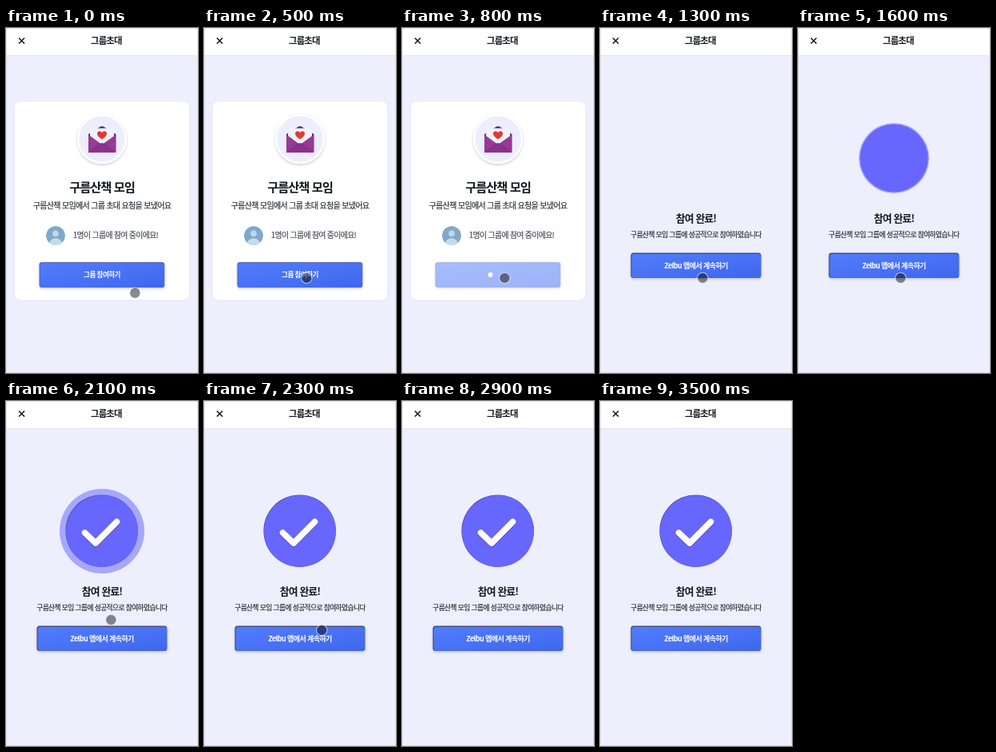
These frames come from a looping animation (240x432 px, 3600 ms). An HTML page:

```html
<!DOCTYPE html>
<html lang="ko">
<head>
<meta charset="utf-8">
<title>그룹초대</title>
<style>
html, body { margin: 0; width: 100%; height: 100%; overflow: hidden; background: #eeeffd; }
svg { display: block; width: 240px; height: 432px; }
text {
  font-family: "Noto Sans CJK KR", "Noto Sans CJK", "Noto Sans", sans-serif;
  letter-spacing: -.067em;
  color: #16181f; fill: currentColor; stroke: currentColor; stroke-width: .2px;
}
.mid { text-anchor: middle; }
.bold { font-weight: 700; stroke: none; }
.body { color: #2b2e36; }
.note { color: #4a4f59; }
.label { color: #fff; font-weight: 700; stroke: none; }
</style>
</head>
<body>
<svg viewBox="0 0 240 432">
  <defs>
    <linearGradient id="blue" x2="1" y2="1">
      <stop stop-color="#527cfd"/><stop offset="1" stop-color="#3f67ed"/>
    </linearGradient>
    <filter id="soft" x="-20%" y="-30%" width="140%" height="170%">
      <feDropShadow dx="0" dy="1.5" stdDeviation="1.5" flood-color="#334" flood-opacity=".25"/>
    </filter>
    <filter id="faint" x="-5%" y="-5%" width="110%" height="110%">
      <feDropShadow dx="0" dy=".5" stdDeviation=".8" flood-color="#334" flood-opacity=".05"/>
    </filter>
    <clipPath id="face"><circle cx="62" cy="260" r="12"/></clipPath>
  </defs>

  <rect width="240" height="432" fill="#eeeffd"/>
  <rect width="240" height="34.5" fill="#fff"/>
  <path d="M0 34.5H240" stroke="#e4e5ee"/>
  <rect x=".25" y=".25" width="239.5" height="431.5" fill="none" stroke="#c9cbd4" stroke-width=".6"/>
  <path d="M16.1 12.5l7 7m0-7l-7 7" stroke="#111" stroke-width="1.5"/>
  <text class="mid bold" x="125.3" y="19.7" font-size="11.3">그룹초대</text>

  <g id="invite">
    <rect x="11" y="92" width="218" height="248.5" rx="7" fill="#fff" filter="url(#faint)"/>
    <circle cx="120" cy="139" r="31" fill="#fff" filter="url(#soft)"/>
    <circle cx="120" cy="139" r="28.7" fill="#eceefc"/>
    <path d="M103 133L118 123.5q2-1.2 4 0L137.3 133V155H103Z" fill="#56205c"/>
    <path d="M105 125.5H135V148H105Z" fill="#f1f1f9"/>
    <path d="M120 139.5c-3-2.3-6-4.4-6-7.2 0-3.4 4.2-4.3 6-1.2 1.8-3.1 6-2.2 6 1.2 0 2.8-3 4.9-6 7.2z" fill="#e23a34"/>
    <path d="M103 133.5L120 146L137.3 133.5V156H103Z" fill="#963a94"/>
    <path d="M103.2 156L118 145q2-1.3 4 0L137.1 156Z" fill="#8a338b"/>
    <path d="M103.5 155.5L118 145q2-1.3 4 0L137 155.5" fill="none" stroke="#6f2474" stroke-width=".6"/>
    <text class="mid bold" x="120" y="204.6" font-size="15.3">구름산책 모임</text>
    <text class="mid body" x="120" y="226.4" font-size="10">구름산책 모임에서 그룹 초대 요청을 보냈어요</text>
    <g clip-path="url(#face)">
      <circle cx="62" cy="260" r="12" fill="#7fa9c8"/>
      <circle cx="62" cy="257.4" r="3.8" fill="#bfd7e7"/>
      <ellipse cx="62" cy="269.3" rx="7.6" ry="6" fill="#c6dbe9"/>
    </g>
    <text class="note" x="83.8" y="263.2" font-size="9.9">1명이 그룹에 참여 중이에요!</text>
    <g id="join">
      <rect x="41.6" y="293.3" width="156.6" height="31.7" rx="3.4" fill="#4a5cab" filter="url(#soft)"/>
      <rect x="42.5" y="294.3" width="155.5" height="30.7" rx="3" fill="url(#blue)"/>
      <text id="joinText" class="mid label" x="120" y="312.3" font-size="8.6">그룹 참여하기</text>
    </g>
    <g id="dots" fill="#fffdf8">
      <circle cx="110.5" cy="309"/><circle cx="120" cy="309"/><circle cx="129.5" cy="309"/>
    </g>
  </g>

  <g id="done">
    <circle id="ring" cx="120" cy="163" fill="#6766ff"/>
    <circle id="rim" cx="119.6" cy="162.6" fill="#4b4b9c"/>
    <circle id="disc" cx="120" cy="163" fill="#6766ff"/>
    <g fill="none" stroke-width="7.6" stroke-linecap="round" stroke-linejoin="round" stroke-dasharray="100 100">
      <path class="tick" pathLength="100" d="M98 166.3L112 179.3L139 152.3" stroke="#4545a8" stroke-opacity=".55"/>
      <path class="tick" pathLength="100" d="M98.5 165L112 178L138.5 151.3" stroke="#fff"/>
    </g>
    <text class="mid bold" x="120" y="242.8" font-size="12.8">참여 완료!</text>
    <text class="mid body" x="120" y="262.3" font-size="8.73">구름산책 모임 그룹에 성공적으로 참여하였습니다</text>
    <rect x="38.5" y="281.6" width="162.9" height="31.5" rx="3.5" fill="#46507f" filter="url(#soft)"/>
    <rect x="39.8" y="283.1" width="161.2" height="29.7" rx="3" fill="url(#blue)"/>
    <text class="mid label" x="120" y="300.8" font-size="9">Zelbu 앱에서 계속하기</text>
  </g>

  <circle id="pointer" r="6.7" fill="#000" fill-opacity=".46" stroke="#fff" stroke-opacity=".55" stroke-width="1.2"/>
</svg>
<script>
const LOOP = 3600, STEP = 100, DONE = 1300;
const $ = id => document.getElementById(id);
const set = (el, attrs) => { for (const k in attrs) el.setAttribute(k, attrs[k]); };
const show = (el, on) => { el.style.display = on ? "" : "none"; };
const clamp = v => Math.max(0, Math.min(1, v));

// Linear interpolation through [time, value] keys
function track(keys, t) {
  let i = 1;
  while (i < keys.length - 1 && keys[i][0] < t) i++;
  const [t0, a] = keys[i - 1], [t1, b] = keys[i];
  return a + (b - a) * clamp((t - t0) / (t1 - t0));
}

const pointerX = [[0, 161.3], [250, 143], [500, 128.3], [1900, 128.3], [2100, 131.3], [2300, 147.2], [2500, 176], [2700, 195]];
const pointerY = [[0, 331.7], [250, 320], [500, 313], [1900, 313], [2000, 291], [2100, 274], [2200, 278], [2300, 287], [2500, 296], [2700, 298.5]];
const discR = [[1300, 0], [1400, 17], [1500, 35], [1600, 42.6], [1800, 45]];
const ringR = [[1300, 0], [1400, 18], [1500, 36], [1600, 44], [1900, 47.5], [2100, 53], [2200, 59]];
const ringAlpha = [[2100, .52], [2200, .25], [2300, 0]];

function draw(t) {
  const loading = t >= 600;
  show($("invite"), t < DONE);
  show($("done"), t >= DONE);

  set($("join"), { opacity: track([[500, 1], [700, .5]], t) });
  show($("joinText"), !loading);
  [...$("dots").children].forEach((dot, i) => {
    const u = t - 650 - 140 * i;
    set(dot, { r: u < 0 ? 0 : 2.9 * Math.max(0, Math.sin(u * Math.PI / 300)) });
  });

  const r = track(discR, t);
  set($("disc"), { r });
  set($("rim"), { r: t < 1700 ? 0 : r + .2 });
  set($("ring"), { r: track(ringR, t), opacity: track(ringAlpha, t) });
  const drawn = clamp((t - 1650) / 300);
  document.querySelectorAll(".tick").forEach(p => {
    show(p, drawn > 0);
    set(p, { "stroke-dashoffset": 100 * (1 - drawn) });
  });

  set($("pointer"), {
    cx: track(pointerX, t),
    cy: track(pointerY, t),
    opacity: track([[2700, 1], [2900, 0]], t)
  });
}

const start = performance.now();
function frame() {
  const t = (performance.now() - start) % LOOP;
  draw(Math.floor(t / STEP) * STEP);
  requestAnimationFrame(frame);
}
frame();
</script>
</body>
</html>
```
